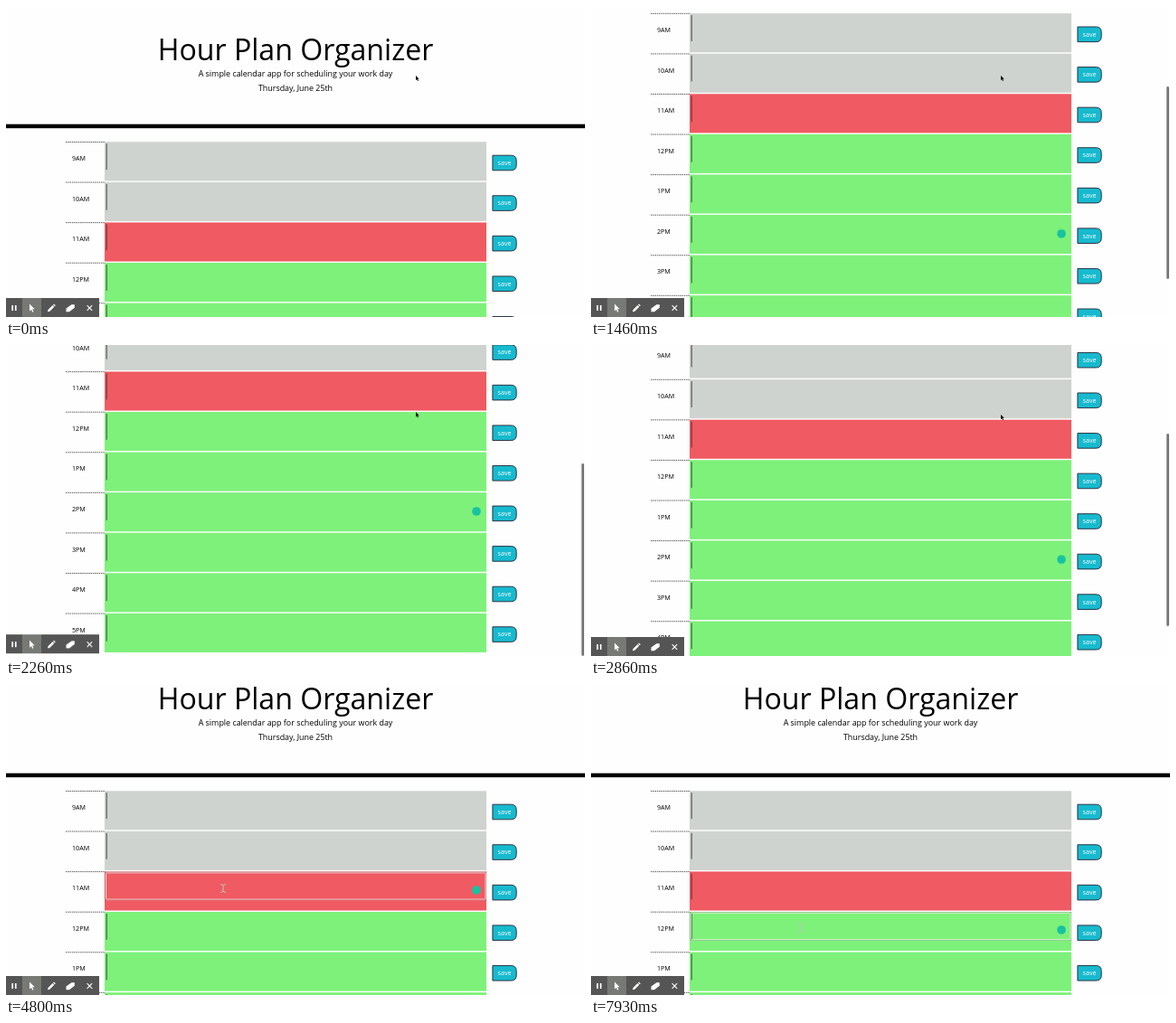
Recreate the animation shown at these times as an HTML page. Size 640x344 px, loop 8 s.

```html
<!DOCTYPE html>
<html lang="en">
<head>
<meta charset="utf-8">
<title>Hour planner</title>
<style>
  @property --scroll { syntax: "<number>"; inherits: true; initial-value: 0; }
  @property --lift { syntax: "<number>"; inherits: true; initial-value: 0; }

  html, body { margin: 0; width: 100%; height: 100%; overflow: hidden; background: #fdfefd; }

  svg {
    display: block; width: 100%; height: 100%;
    font-family: "Open Sans", "Noto Sans", sans-serif;
    animation: scroll 8s infinite, lift 8s linear infinite;
  }
  #page { transform: translateY(calc(var(--scroll) * -1px)); }
  #overlay { transform: translateY(calc(var(--lift) * -1px)); }
  #thumb {
    fill: #777;
    transform: translateY(calc(var(--scroll) * .619px));
    animation: thumb 8s linear infinite;
  }
  .heading { text-anchor: middle; font-size: 8.91px; }
  .heading .title { font-size: 32.09px; }
  .label { font-size: 7.13px; }
  .rule { stroke: #444; stroke-width: .9; stroke-dasharray: 1.4 .9; }
  .edge { stroke: #333; stroke-width: .9; }
  .button { fill: #17bace; stroke: #223; stroke-width: .9; }
  .save { fill: #fff; font-size: 7.13px; text-anchor: middle; }
  .past { fill: #cfd3d0; }
  .present { fill: #f05a62; }
  .future { fill: #7ef17a; }

  .ring { fill: none; animation: 8s step-end infinite; }
  #ring-11AM { animation-name: firstFocus; }
  #ring-12PM { animation-name: secondFocus; }
  #edge-11AM { animation: firstBlur 8s step-end infinite; }
  #badge { fill: #18c2a0; animation: badge 8s step-end infinite; }

  #pointer { animation: pointer 8s infinite; }
  #arrow { animation: arrow 8s step-end infinite; }
  #beam { fill: none; stroke: #bcc6b8; animation: beam 8s step-end infinite; }

  @keyframes scroll {
    0%, 7.5% { --scroll: 0; animation-timing-function: cubic-bezier(.4, 0, .8, .8); }
    18.25% { --scroll: 142; animation-timing-function: cubic-bezier(.3, .5, .6, 1); }
    27%, 30% { --scroll: 210; animation-timing-function: cubic-bezier(.5, 0, .8, .6); }
    35.75% { --scroll: 157; animation-timing-function: cubic-bezier(.3, .33, .6, 1); }
    43.25%, 100% { --scroll: 32; }
  }
  @keyframes lift {
    0%, 24% { --lift: 0; }
    27%, 29.5% { --lift: 2.8; }
    32.5%, 100% { --lift: 0; }
  }
  @keyframes thumb {
    0%, 7.4% { opacity: 0; }
    7.5%, 48.5% { opacity: 1; }
    52%, 100% { opacity: 0; }
  }
  @keyframes firstFocus {
    0% { opacity: 0; }
    55% { opacity: 1; }
    80%, 100% { opacity: 0; }
  }
  @keyframes firstBlur {
    0% { opacity: 1; }
    55% { opacity: 0; }
    80%, 100% { opacity: 1; }
  }
  @keyframes secondFocus {
    0% { opacity: 0; }
    80%, 100% { opacity: 1; }
  }
  @keyframes badge {
    0% { transform: translateY(394px); }
    55% { transform: translateY(260px); }
    80%, 100% { transform: translateY(304px); }
  }
  @keyframes pointer {
    0%, 45% { transform: translate(453px, 77px); animation-timing-function: ease-in-out; }
    53.5%, 69% { transform: translate(240px, 226px); animation-timing-function: ease-in-out; }
    75%, 100% { transform: translate(232px, 269.5px); }
  }
  @keyframes arrow {
    0% { opacity: 1; }
    48.4%, 100% { opacity: 0; }
  }
  @keyframes beam {
    0% { opacity: 0; }
    48.4%, 100% { opacity: 1; }
  }
</style>
</head>
<body>
<svg viewBox="0 0 640 344">
  <g id="page">
    <g class="heading">
      <text class="title" x="320" y="60">Hour Plan Organizer</text>
      <text x="320" y="78">A simple calendar app for scheduling your work day</text>
      <text x="320" y="94">Thursday, June 25th</text>
    </g>
    <rect y="130.7" width="640" height="4.5"/>
    <g id="rows"></g>
    <circle id="badge" cx="520" r="4.8"/>
  </g>

  <rect id="thumb" x="636.2" y="1" width="2.8" height="213" rx="1.4"/>

  <g id="overlay">
    <g id="toolbar" fill="#fff">
      <rect y="323" width="103" height="21" fill="#555"/>
      <rect x="18" y="323" width="21" height="21" fill="#777975"/>
      <path d="M6.3 331h1.7v6h-1.7zM9.9 331h1.7v6h-1.7z"/>
      <path d="M26 329.6v8l1.9-1.8 1.3 2.9 1.2-.6-1.3-2.8h2.6z"/>
      <path d="M46 338.3l.5-2.3 5-5 1.8 1.8-5 5zM52.1 330.4l.9-.9 1.8 1.8-.9.9z"/>
      <path d="M66.5 338.2v-3.7l6-4.2h3.3v3.5l-5.8 4.4z"/>
      <path d="M89.6 331.2l5.6 5.6m0-5.6l-5.6 5.6" stroke="#fff" stroke-width="1.1"/>
    </g>
    <g id="pointer">
      <path id="arrow" d="M0 0v5.2l1.2-1.1.9 2 .9-.4-.9-1.9h1.6z"/>
      <path id="beam" d="M-3 -4.3q2.4 0 3 1.1q.6-1.1 3-1.1M0 -3.2v6.4M-3 4.3q2.4 0 3-1.1q.6 1.1 3 1.1"/>
    </g>
  </g>
</svg>
<script>
  const firstTop = 150.3, pitch = 44.57, currentHour = 11;

  const state = hour =>
    hour < currentHour ? "past" : hour === currentHour ? "present" : "future";

  const name = hour => (hour % 12 || 12) + (hour < 12 ? "AM" : "PM");

  const ring = label => `
    <g class="ring" id="ring-${label}">
      <rect x="109.6" y=".4" width="421.2" height="31.2" rx="1" stroke="#444" stroke-opacity=".5" stroke-width=".6"/>
      <rect x="110.5" y="1.2" width="419.6" height="29.6" rx="1" stroke="#f1efef" stroke-opacity=".9"/>
    </g>`;

  function row(hour, index) {
    const label = name(hour);
    const focusable = hour === 11 || hour === 12;
    return `<g transform="translate(0 ${firstTop + index * pitch})">
      <path class="rule" d="M66 .2h43"/>
      <text class="label" x="73" y="20.9">${label}</text>
      <rect class="${state(hour)}" x="109" width="422" height="43.1"/>
      <path class="edge" id="edge-${label}" d="M111.2 2v28.8"/>
      ${focusable ? ring(label) : ""}
      <path class="button" d="M537.9 14.9h20.3q6 0 6 6v4.6q0 6-6 6h-20.3z"/>
      <text class="save" x="551" y="25.6">save</text>
    </g>`;
  }

  document.getElementById("rows").innerHTML =
    Array.from({ length: 9 }, (_, i) => row(i + 9, i)).join("");
</script>
</body>
</html>
```
